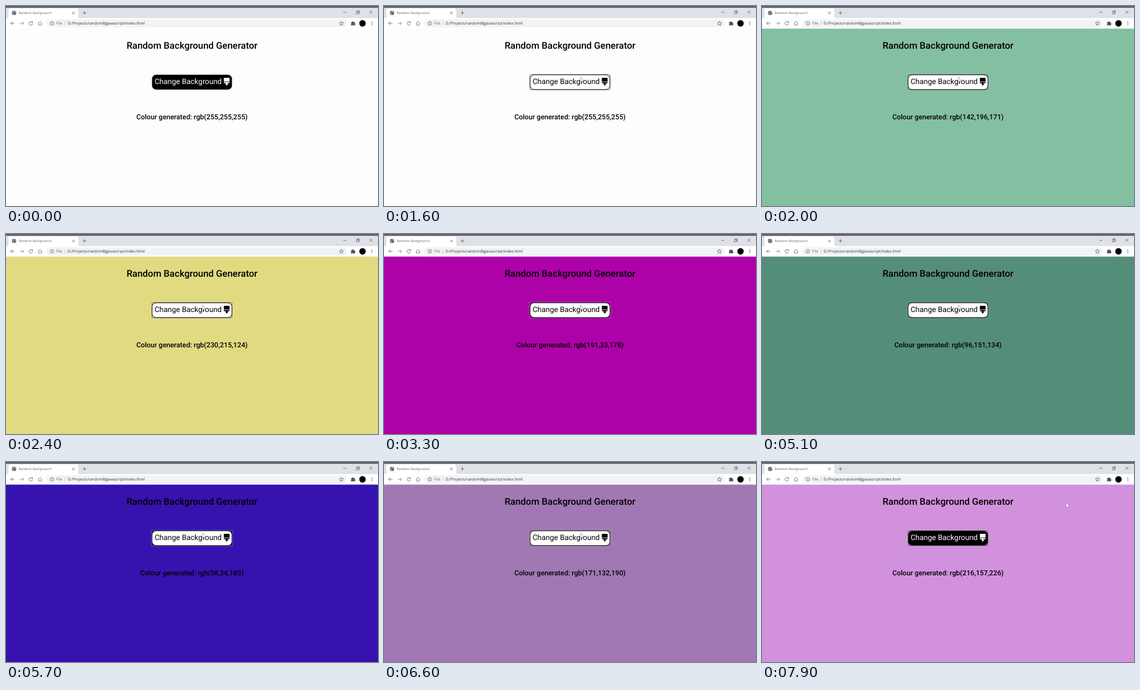
An HTML page for the animation above (8000 ms loop, 600 by 323 pixels).

```html
<!DOCTYPE html>
<html lang="en">
<head>
<meta charset="utf-8">
<title>Random Background</title>
<style>
  html, body { margin: 0; width: 100%; height: 100%; overflow: hidden; }
  svg { display: block; width: 100vw; height: 100vh; text-rendering: geometricPrecision; }
  .ui { font-family: "Open Sans", "Noto Sans", sans-serif; }
  .page { font-family: Roboto, "Open Sans", sans-serif; text-anchor: middle; }
  .line { fill: none; stroke: #55585d; stroke-width: .75; }
</style>
</head>
<body>
<svg viewBox="0 0 600 323" preserveAspectRatio="none">
  <!-- page -->
  <rect id="page" y="36" width="600" height="287"/>

  <!-- tab strip -->
  <rect width="600" height="20" fill="#dee1e6"/>
  <rect width="600" height="3" fill="#69646d"/>
  <path d="M1 20q3 0 3-3V7q0-3 3-3h106.500q3 0 3 3v10q0 3 3 3z" fill="#fff"/>
  <circle cx="13" cy="11.200" r="3.400" fill="#55595e"/>
  <path d="M10.300 10.700q1.700.2 2.200 1.300t-.3 2M13 8.300q-.2 1.400 1.200 1.500t1.700 1.200" fill="none" stroke="#fff" stroke-width=".8"/>
  <g class="ui">
    <text x="20.500" y="13.100" font-size="5.360" fill="#6c6279">Random Background</text>
  </g>
  <g class="line">
    <path d="M106.900 9.400l3.800 3.800m0-3.800l-3.800 3.800"/>
    <path d="M123.700 11.100h5.600m-2.800-2.800v5.600"/>
    <path d="M544 10.200h5"/>
    <path d="M565.200 9h3.600v3.600h-3.600zM566.400 9v-1.200h3.600v3.600h-1.200"/>
    <path d="M586.300 7.800l4.500 4.500m0-4.500l-4.500 4.500"/>
  </g>

  <!-- toolbar -->
  <rect y="19.500" width="600" height="17" fill="#fff"/>
  <rect x="65" y="21.500" width="485" height="13" rx="6.500" fill="#f1f3f4"/>
  <g class="line">
    <path d="M13.600 28H7.500m2.800-2.800L7.500 28l2.800 2.800"/>
    <path d="M22.500 28h6m-2.800-2.800l2.800 2.800l-2.800 2.800" stroke="#777b80"/>
    <path d="M42.400 26.200a2.900 2.900 0 1 0 .5 2.500M42.900 24.700v2.200h-2.200"/>
    <path d="M51.700 28.200l3.300-3.200l3.300 3.200M52.700 27.500v3.400h4.600v-3.400" stroke-width=".7"/>
    <circle cx="74" cy="28" r="2.900" stroke-width=".65"/>
    <path d="M74 27.600v2m0-3.300v.7"/>
    <path id="star" stroke-width=".7"/>
    <path d="M95 25.300v5.400" stroke="#a5a8ac" stroke-width=".6"/>
  </g>
  <g class="ui" font-size="6.200">
    <text x="81" y="30.400" fill="#65696e">File</text>
    <text x="99.300" y="30.400" fill="#303236">D:/Projects/randomBgJavascript/index.html</text>
  </g>
  <path d="M556.500 26h1.900a1.200 1.200 0 0 1 2.400 0h1.700v1.900a1.200 1.200 0 0 1 0 2.400v1.300h-2.200a1.100 1.100 0 0 0-2.100 0h-1.700v-2a1.100 1.100 0 0 0 0-2z" fill="#505458"/>
  <circle cx="575" cy="28" r="5.200"/>
  <g fill="#505458">
    <circle cx="590" cy="25.700" r=".75"/><circle cx="590" cy="28" r=".75"/><circle cx="590" cy="30.300" r=".75"/>
  </g>

  <!-- page content -->
  <g class="page">
    <text x="300" y="69.400" font-size="15.080" font-weight="500">Random Background Generator</text>
    <text id="label" x="300" y="183.400" font-size="11.250" font-weight="500"></text>
    <g id="ring" fill="none">
      <rect x="234.700" y="110.200" width="130.600" height="25.600" rx="1" stroke="#fff" stroke-opacity=".5" stroke-width=".7"/>
      <rect x="235.300" y="110.800" width="129.400" height="24.400" rx="1" stroke="#000" stroke-opacity=".85" stroke-width=".6"/>
    </g>
    <rect id="button" x="235.600" y="111.100" width="128.800" height="23.800" rx="6.500"/>
    <g id="caption">
      <text x="293.800" y="126.300" font-size="12.100">Change Background</text>
      <path d="M351.400 122v-5.200q0-.8.8-.8h7.600q.8 0 .8.800v5.200zM351.400 122.700h9.200v.9q0 1.200-1.200 1.200h-1.900v1.900a1.500 1.500 0 0 1-3 0v-1.900h-1.900q-1.200 0-1.200-1.200z"/>
    </g>
  </g>

  <path id="cursor" d="M0 0v7.800l1.800-1.600l1.200 2.600l1.300-.6l-1.200-2.500h2.500z" fill="#fff" stroke="#6c7088" stroke-width=".6"/>
</svg>

<script>
  const $ = id => document.getElementById(id);
  const LOOP = 8000, STEP = 100, FOCUS_AT = 1500;

  // [time, generated colour, colour on screen]
  const clicks = [
    [0, "255,255,255", "#fdfdfd"],
    [1700, "142,196,171", "#84bfa2"],
    [2200, "230,215,124", "#e1da80"],
    [2700, "204,128,119", "#c67469"],
    [3200, "191,33,178", "#ae02a9"],
    [3700, "117,142,203", "#6983c4"],
    [4300, "181,84,239", "#aa3de6"],
    [5000, "96,151,134", "#558d7b"],
    [5500, "58,34,185", "#3612af"],
    [6000, "148,118,172", "#8b69a4"],
    [6400, "171,132,190", "#a178b4"],
    [6900, "216,157,226", "#d291dd"]
  ];

  // [time, x, y] of the pointer tip
  const route = [
    [300, 99, 264], [600, 185, 218], [900, 290, 140], [1100, 317, 115],
    [7200, 317, 115], [7400, 380, 96], [7600, 532, 51], [7800, 494, 64], [7900, 490.5, 66]
  ];

  function pointerAt(t) {
    const next = route.findIndex(p => p[0] > t);
    if (next === 0) return null;
    if (next < 0) return route.at(-1).slice(1);
    const a = route[next - 1], b = route[next];
    const k = (t - a[0]) / (b[0] - a[0]);
    return [a[1] + (b[1] - a[1]) * k, a[2] + (b[2] - a[2]) * k];
  }

  const overButton = p => p && p[0] > 235 && p[0] < 365 && p[1] > 110 && p[1] < 136;

  function draw(t) {
    const [, rgb, fill] = clicks.findLast(c => c[0] <= t);
    $("page").setAttribute("fill", fill);
    $("label").textContent = `Colour generated: rgb(${rgb})`;

    const p = pointerAt(t), hover = overButton(p), focus = t >= FOCUS_AT;
    $("cursor").style.display = p ? "" : "none";
    if (p) $("cursor").setAttribute("transform", `translate(${p})`);

    $("ring").style.display = focus ? "" : "none";
    $("button").setAttribute("fill", hover ? "#fff" : "#000");
    $("button").setAttribute("stroke", hover ? "#000" : "#666");
    $("button").setAttribute("stroke-width", hover ? .9 : .6);
    $("caption").setAttribute("fill", hover ? "#000" : "#fff");
  }

  const starPoint = (_, i) => {
    const r = i % 2 ? 1.6 : 3.7, a = i * Math.PI / 5;
    return [541 + r * Math.sin(a), 28.2 - r * Math.cos(a)].map(v => v.toFixed(2));
  };
  $("star").setAttribute("d", `M${Array.from({ length: 10 }, starPoint).join("L")}Z`);

  const start = performance.now();
  function tick() {
    const t = (performance.now() - start) % LOOP;
    draw(Math.floor(t / STEP) * STEP);
    requestAnimationFrame(tick);
  }
  tick();
</script>
</body>
</html>
```
